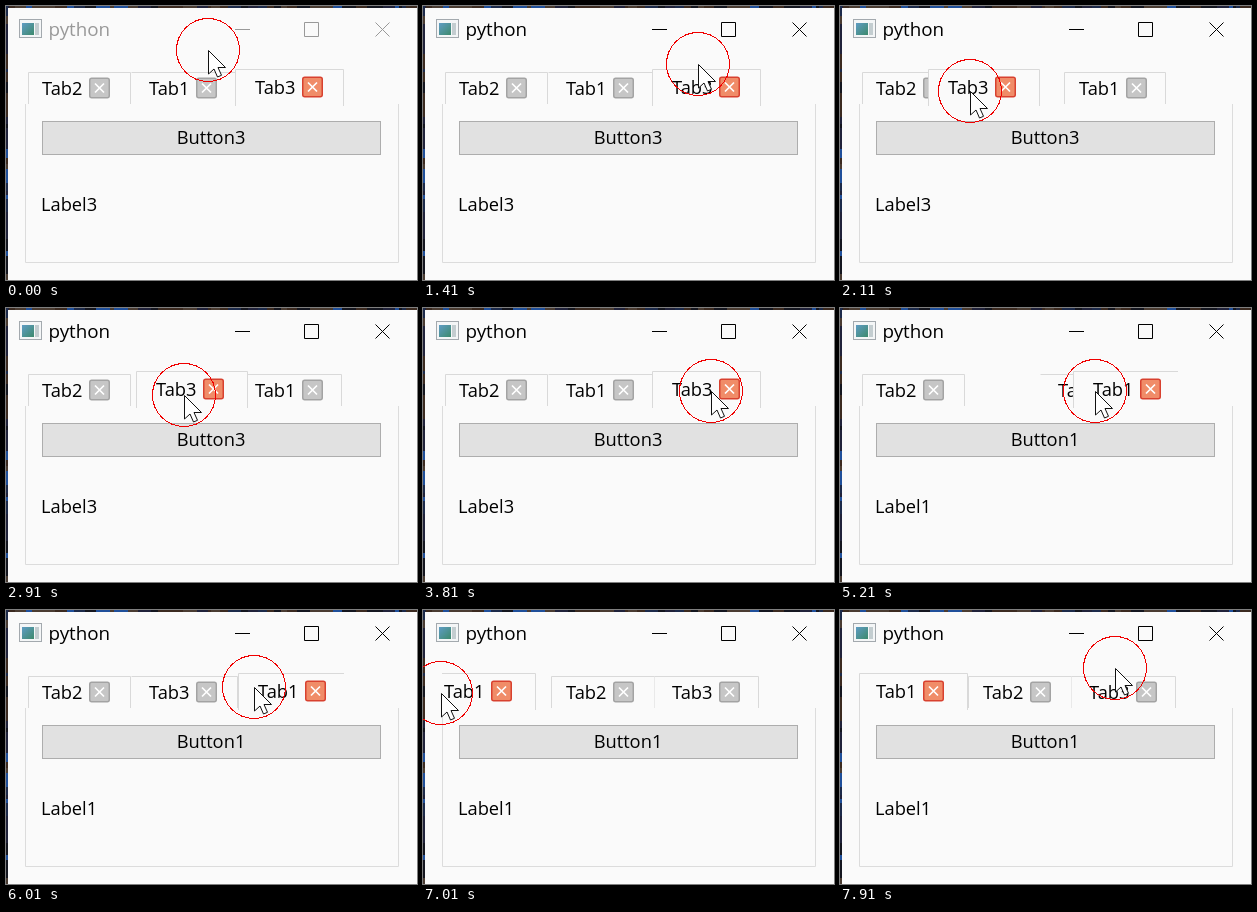
Write an HTML page that moves like this. It is 411 by 274 pixels and loops after 8 s.

```html
<!DOCTYPE html>
<html lang="en">
<head>
<meta charset="utf-8">
<title>Movable tabs</title>
<style>
  html, body { margin: 0; width: 100%; height: 100%; overflow: hidden; background: #fafafa; }
  svg { display: block; width: 411px; height: 274px; font: 18.3px "Open Sans", "Noto Sans", sans-serif; }
</style>
</head>
<body>
<svg viewBox="0 0 411 274">
  <defs>
    <clipPath id="bar"><rect x="19" y="60" width="319" height="40"/></clipPath>
    <linearGradient id="screen" x2="1" y2="1">
      <stop stop-color="#5f9cc4"/><stop offset="1" stop-color="#3d8a6c"/>
    </linearGradient>
  </defs>
  <g id="desktop"></g>
  <rect x="2" y="2" width="409" height="272" fill="#fafafa"/>

  <g id="icon">
    <rect x="13.5" y="13.5" width="22" height="18" fill="#f4f6f7" stroke="#a3a9ae"/>
    <rect x="16" y="17" width="12" height="12" fill="url(#screen)"/>
    <rect x="29" y="17" width="4" height="12" fill="#c3cdd0"/>
  </g>
  <text id="title" x="42.5" y="30" font-size="18.8">python</text>
  <path id="controls" d="M229 23.5H244M298.5 16.5H312.5V30.5H298.5ZM369.5 16.5L383.5 30.5M383.5 16.5L369.5 30.5" fill="none"/>

  <path d="M19.5 98V256.5H392.5V98" fill="none" stroke="#dcdcdc"/>
  <rect x="36.5" y="115.5" width="338" height="33" fill="#e1e1e1" stroke="#adadad"/>
  <text id="button" x="205" y="138" text-anchor="middle"></text>
  <text id="label" x="35" y="205"></text>

  <g id="tabs" clip-path="url(#bar)"></g>

  <g id="pointer">
    <circle r="31.5" fill="none" stroke="#f00000" shape-rendering="crispEdges"/>
    <path d="M.5 .5V24L6 19L9.5 27L13.5 25.3L10 17.5H17.5Z" fill="#fff" stroke="#111"/>
  </g>
</svg>
<script>
const LOOP = 8000, ACTIVATE = 1410, GLIDE = 250, LAG = 8;
const $ = id => document.getElementById(id);
const clamp = p => Math.min(1, Math.max(0, p));
const mix = (a, b, p) => a + (b - a) * p;
const ease = p => p < .5 ? 2 * p * p : 1 - 2 * (1 - p) ** 2;
const slotX = slot => Math.floor(36.5 + 106.5 * slot);

// Time, x, y of the pointer's turning points.
const PATH = [
  [0, 202, 44], [610, 275, 58], [1510, 275, 58], [1910, 222, 82], [2110, 130, 85],
  [2410, 68, 90], [2510, 68, 90], [3310, 288, 83], [3910, 288, 83], [4410, 315, 33],
  [4610, 83, 77], [4710, 83, 77], [4910, 140, 83], [5210, 255, 83], [5610, 347, 77],
  [5710, 347, 77], [6010, 248, 77], [7010, 18, 83], [7110, 18, 83], [7410, 123, 81],
  [7510, 123, 81], [7910, 62, 81]
];
const DRAGS = [
  { tab: 3, grab: 1510, release: 3200, offset: -26 },
  { tab: 1, grab: 4910, release: 7110, offset: 1.5 }
];
// Tab order from left to right after each swap.
const ORDERS = [
  [-GLIDE, "213"], [1914, "231"], [2160, "321"], [2660, "231"],
  [3100, "213"], [5114, "231"], [6230, "213"], [6660, "123"]
];

function pointerAt(t) {
  const i = Math.max(1, PATH.findIndex(([time]) => time > t));
  const [a, b] = [PATH[i - 1], PATH[i]];
  const p = clamp((t - a[0]) / (b[0] - a[0]));
  return [mix(a[1], b[1], p), mix(a[2], b[2], p)];
}

function glidingX(tab, t) {
  return ORDERS.reduce((x, [at, order]) =>
    mix(x, slotX(order.indexOf(tab)), ease(clamp((t - at) / GLIDE))), 0);
}

function tabX(tab, t, drag) {
  if (tab !== drag.tab || t < drag.grab) return glidingX(tab, t);
  const held = pointerAt(Math.min(t, drag.release) - LAG)[0] + drag.offset;
  return mix(held, glidingX(tab, t), ease(clamp((t - drag.release) / GLIDE)));
}

function closeBox(x, y, active) {
  const [fill, edge] = active ? ["#f08c68", "#d8412f"] : ["#c6c6c6", "#a3a3a3"];
  return `<g transform="translate(${x} ${y})">
    <rect x=".75" y=".75" width="19.5" height="19.5" rx="2" fill="${fill}" stroke="${edge}" stroke-width="1.5"/>
    <path d="M6 6L15 15M15 6L6 15" stroke="#fff" stroke-width="1.7"/></g>`;
}

// Inactive neighbours share one border; the active tab overlaps both sides.
function drawTab(tab, x, slot, active, afterActive) {
  const last = slot === 2, lift = active ? 1 : 0;
  const ownBorder = active || afterActive || slot === 0;
  const inset = active ? (slot ? 20 : 17) : slot === 0 ? 14 : afterActive ? 15 : 18;
  const left = x - inset + .5;
  const right = x + (active ? 91 : 88) - (last ? 2 + lift : 0) + .5;
  const top = 66.5 - 3 * lift, bottom = 98 + 2 * lift;
  const edge = ownBorder ? `M${left} ${bottom}V${top}` : `M${left} ${top}`;
  return `<rect x="${left}" y="${top}" width="${right - left}" height="${bottom - top}" fill="#fafafa"/>
    <path d="${edge}H${right}V${bottom}" fill="none" stroke="#d9d9d9"/>
    <text x="${x}" y="${89 - lift}">Tab${tab}</text>${closeBox(x + 47, 71.5 - lift, active)}`;
}

function renderTabs(t, drag) {
  const order = ORDERS.filter(([at]) => at <= t).pop()[1];
  const activeSlot = order.indexOf(drag.tab);
  const slots = [0, 1, 2].filter(slot => slot !== activeSlot).concat(activeSlot);
  $("tabs").innerHTML = slots.map(slot => {
    const x = Math.round(tabX(+order[slot], t, drag));
    return drawTab(order[slot], x, slot, slot === activeSlot, slot === activeSlot + 1);
  }).join("");
}

function render(time) {
  // The screen refreshes every 100 ms.
  const t = time < 100 ? 0 : Math.floor((time - 10) / 100) * 100 + 10;
  const drag = DRAGS[t < DRAGS[1].grab ? 0 : 1];
  const ink = t < ACTIVATE ? "#999" : "#000";
  renderTabs(t, drag);
  $("title").setAttribute("fill", ink);
  $("controls").setAttribute("stroke", ink);
  $("button").textContent = "Button" + drag.tab;
  $("label").textContent = "Label" + drag.tab;
  $("pointer").setAttribute("transform", `translate(${pointerAt(t).map(Math.round)})`);
}

// Slivers of desktop behind the window.
function drawDesktop() {
  let seed = 7;
  const random = () => (seed = seed * 16807 % 2147483647) / 2147483647;
  const colors = ["#1c2a4a", "#3b2a20", "#14161f", "#4a3c32", "#1f4f9a", "#20223a"];
  const strip = (length, rect) => {
    let out = "";
    for (let p = 0, size; p < length; p += size) {
      size = 3 + Math.floor(random() * 12);
      out += `<rect ${rect(p, size)} fill="${colors[Math.floor(random() * colors.length)]}"/>`;
    }
    return out;
  };
  $("desktop").innerHTML =
    strip(411, (p, s) => `x="${p}" y="0" width="${s}" height="2"`) +
    strip(274, (p, s) => `x="0" y="${p}" width="2" height="${s}"`);
}

drawDesktop();
const begin = performance.now();
function frame() {
  render((performance.now() - begin) % LOOP);
  requestAnimationFrame(frame);
}
frame();
</script>
</body>
</html>
```
